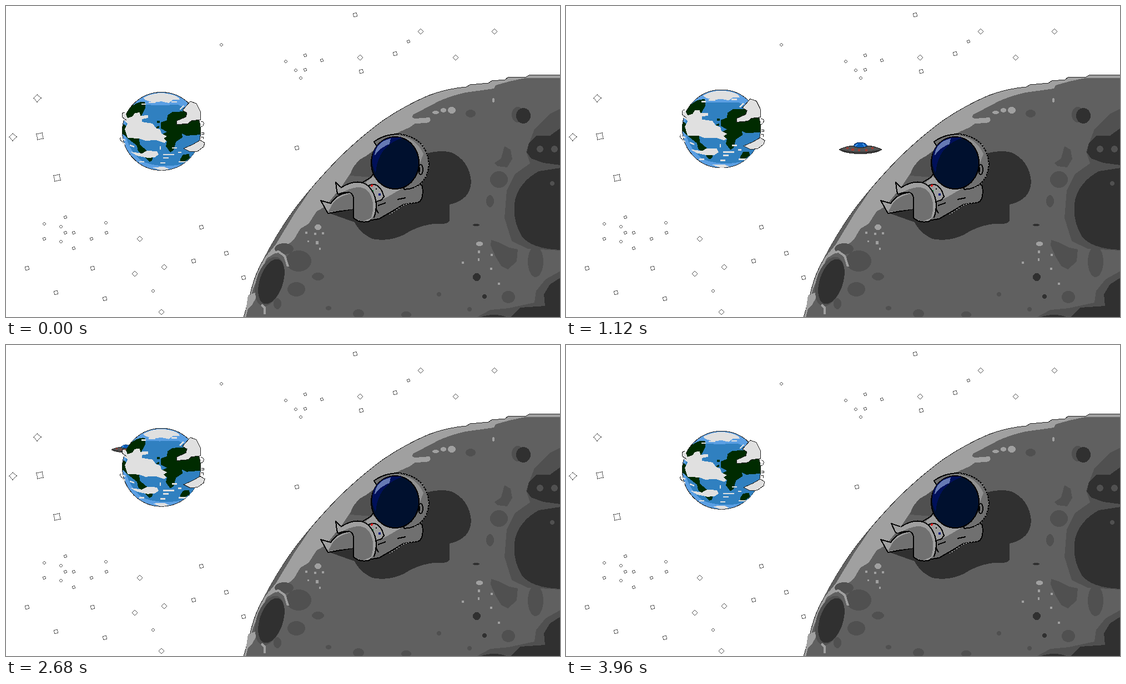
Write an HTML page that moves like this. It is 998x561 px and loops after 4 s.

```html
<!DOCTYPE html>
<html lang="en">
<meta charset="utf-8">
<title>Lunar lounging</title>
<style>
html, body { margin: 0; width: 100%; height: 100%; overflow: hidden; background: #fff }
svg { display: block; width: 100%; height: 100% }
.star { fill: #fff; stroke: #333; stroke-width: .8 }
.mid { fill: #505050 }
.dark { fill: #303030 }
.light { fill: #a0a0a0 }
.line { fill: none; stroke: #000; stroke-width: 2 }
.ink { stroke: #000; stroke-width: 2 }
.cloud { fill: #e0e0e0 }
.edge { stroke: #222; stroke-width: 1 }
.wisp { fill: none; stroke: #e0e0e0; stroke-width: 2.5 }
.land { fill: #002b00 }
</style>
<svg viewBox="0 0 998 561" shape-rendering="crispEdges">
<defs><clipPath id="globe"><circle cx="280" cy="226" r="70.5"/></clipPath></defs>
<g id="stars"></g>

<g id="ufo">
  <path d="M-13-2Q-11-11 0-11T13-2Z" fill="#0b5cb5" stroke="#012a60"/>
  <path d="M-5-9L-10-3M4-9L8-3" stroke="#3f94e8" stroke-width="2"/>
  <path d="M-36 1Q-24-5-13-5Q0 1 13-5Q24-5 36 1Q25 8 0 8T-36 1Z" fill="#555" stroke="#222"/>
  <path d="M-33 2Q0 10 33 2" fill="none" stroke="#333" stroke-width="2"/>
  <path d="M-24-1h4M-15 1h4M-4 2h4M8 2h4M18-1h4" stroke="#a33b32" stroke-width="3"/>
</g>

<g id="earth">
  <circle cx="280" cy="226" r="70.5" fill="#5b9fe3" class="edge"/>
  <g clip-path="url(#globe)">
    <path d="M238 177Q265 180 310 178Q340 190 350 217Q352 260 325 283Q285 295 247 281Q218 260 214 223Q217 190 238 177Z" fill="#3080c0"/>
    <g class="land">
      <path d="M222 185Q236 171 250 173Q254 182 248 190L240 205L213 206Q211 199 222 185Z"/>
      <path d="M205 226L212 213L240 239L241 250L254 261L264 270Q266 280 258 281L248 270L238 262L236 252L222 241Z"/>
      <path d="M279 210L290 206L291 197L300 191L325 190L350 204V232L325 234L317 230L318 237L306 245L302 260L296 264L288 253L290 244L281 238L282 231L290 227L279 221Z"/>
      <path d="M314 276L319 268L330 267L331 274L320 282L314 280ZM271 218l5-2v4l-5 1zM272 207h5v4h-5z"/>
    </g>
    <path class="cloud" d="M247 166Q262 157 282 157Q310 160 313 169L301 169L293 175L280 172L266 174L252 170Z"/>
    <path class="cloud" d="M264 291L285 290L294 294L280 297Z"/>
    <path class="wisp" d="M244 177h8M257 174h12M298 173h10M283 268h20M283 274h10M299 256h9M278 253v6M310 264h6M240 281h9M311 281h15M278 283h9M320 180l-7 7"/>
  </g>
  <g class="cloud">
    <path class="edge" d="M318 188L332 172L343 176L350 190L351 205L334 207L328 212L307 214L308 207L324 200L326 193Z"/>
    <path class="edge" d="M320 257L336 250L350 242L358 247L356 254L345 262L332 263Z"/>
    <path d="M210 194L216 195L219 202L228 199L232 193L241 192L242 198L256 197V202L245 204V209L264 212L270 220L278 223L280 230L290 235L284 239L289 244L285 247L270 242L251 243L240 239L219 238L214 222L219 212L210 204Z"/>
    <path d="M224 263L245 266L254 261L272 262L275 268L268 273L255 274L236 270Z"/>
  </g>
  <path d="M214 192Q207 192 210 201L217 206M207 237q-4 4 4 9M351 208q6 0 5 5t-5 5M352 228h4v3h-4M351 236h4v4" fill="none" stroke="#222"/>
  <path class="wisp" d="M206 239l9 3M209 247l6 2M223 251l8 3M350 214l5 2"/>
</g>

<g id="moon">
  <path class="light edge" d="M428 562L440 520Q447 486 464 457Q490 407 520 366Q555 320 600 274Q640 235 680 206Q720 179 760 162Q793 149 829 146L836 142L869 139L875 135L899 133L905 128L937 128L942 125L999 124V562Z"/>
  <path fill="#606060" d="M999 130L935 130L907 136L882 143L879 149L850 153L828 156Q790 165 770 177L735 195Q727 202 738 203L763 201Q768 209 757 211L737 212L727 219L700 231L668 256L640 277Q625 287 621 301L605 325L575 362L560 370L545 393L530 402L519 421L505 433L470 455L445 510L432 562H999Z"/>
  <path fill="#606060" d="M464 457Q490 407 520 366L554 324L520 374L486 430Z"/>
  <g class="mid">
    <path d="M999 185L979 195L952 222L937 262L944 284L917 303L902 333L898 382L911 424L940 438L999 441Z"/>
    <path d="M999 478L972 493L955 514L952 535L906 545L873 548L847 562H999Z"/>
    <path d="M898 253L909 259L912 276L903 291L885 289L880 283L892 275ZM874 422L889 427L907 436L922 439L920 461L904 475L892 469L882 452L873 432Z"/>
    <path d="M667 260L639 276Q624 288 620 306L660 309Z"/>
    <ellipse cx="837" cy="194" rx="9" ry="7"/><ellipse cx="922" cy="196" rx="11" ry="14"/>
    <ellipse cx="888" cy="313" rx="16" ry="15"/><ellipse cx="872" cy="352" rx="7" ry="11"/>
    <ellipse cx="954" cy="461" rx="14" ry="28"/><ellipse cx="905" cy="525" rx="12" ry="11"/>
    <ellipse cx="527" cy="460" rx="23" ry="19"/><ellipse cx="501" cy="438" rx="17" ry="10"/>
    <ellipse cx="523" cy="511" rx="16" ry="13"/><ellipse cx="562" cy="488" rx="11" ry="7"/>
    <ellipse cx="489" cy="537" rx="7" ry="10"/><ellipse cx="581" cy="545" rx="5" ry="4"/>
    <ellipse cx="635" cy="555" rx="10" ry="8"/><ellipse cx="721" cy="557" rx="9" ry="6"/>
    <circle cx="780" cy="520" r="4"/><circle cx="835" cy="547" r="4"/>
    <ellipse cx="475" cy="497" rx="24" ry="46" transform="rotate(18 475 497)"/>
  </g>
  <g class="dark">
    <path d="M747 270Q776 258 802 264Q834 278 838 316Q837 350 799 358V387Q796 395 770 393Q740 397 718 412Q690 426 660 420Q638 410 628 390L580 373L600 345H650Z"/>
    <path d="M999 220L980 234L955 234L942 247L938 264L946 275L968 283L999 287ZM999 292L960 298Q925 317 917 350Q911 385 929 415Q946 438 999 440ZM999 490L980 502L969 520L971 541L926 544L908 562H999ZM852 562Q880 552 904 562Z"/>
    <ellipse cx="932" cy="198" rx="13" ry="14"/><ellipse cx="847" cy="395" rx="6" ry="2"/>
    <circle cx="848" cy="489" r="7"/><circle cx="862" cy="524" r="4"/>
    <ellipse cx="478" cy="497" rx="21" ry="42" transform="rotate(18 478 497)"/>
  </g>
  <g class="mid"><circle cx="962" cy="258" r="6"/><circle cx="988" cy="258" r="6"/><circle cx="984" cy="320" r="4"/></g>
  <g class="light">
    <ellipse cx="803" cy="188" rx="7" ry="6"/><ellipse cx="788" cy="188" rx="5" ry="4"/>
    <ellipse cx="774" cy="192" rx="6" ry="3"/><ellipse cx="878" cy="170" rx="2" ry="4"/>
    <ellipse cx="562" cy="399" rx="6" ry="5"/><ellipse cx="853" cy="429" rx="6" ry="4"/>
    <path d="M539 407h4v4h-4zM569 408h4v4h-4zM558 424h5v6h-5zM543 423h3v3h-3zM564 436h3v4h-3zM555 409h4v4h-4zM850 441h4v5h-4zM873 447h4v4h-4zM872 472h4v4h-4zM821 461h4v4h-4zM886 499h4v4h-4zM850 455h3v5h-3z"/>
    <path d="M436 522L449 517L450 527L444 538L432 550Z"/>
  </g>
  <path d="M472 447L491 443L502 451L508 470M460 539l6 5v12" fill="none" stroke="#a0a0a0" stroke-width="4"/>
</g>

<g id="astronaut" stroke-linejoin="round">
  <path class="ink" fill="#707070" d="M662 303L656 310L641 319L645 388L672 384L691 373L716 358L743 354Q753 349 750 325L740 317Z"/>
  <path d="M661 308L648 318L674 352L712 330Z" fill="#a0a0a0"/>
  <path d="M680 348L710 334L744 330L742 345L715 355L690 371Z" fill="#707070"/>
  <path class="line" d="M670 360l14-5M705 349l15-3"/>
  <path class="ink" fill="#a0a0a0" stroke-width="1" d="M650 326Q666 315 677 333L681 344L676 350L663 354L650 340Z"/>
  <path d="M651 332h3M655 340h3M663 346h3M666 330h2" class="line"/>
  <circle cx="659" cy="324" r="2" fill="#e02020"/><circle id="lamp" cx="660" cy="334" r="2" fill="#149a45"/>
  <circle cx="673" cy="340" r="2.5" fill="#102080"/>
  <path class="ink" fill="#a0a0a0" d="M567 351L585 356Q598 336 625 336L638 364L580 374Z"/>
  <path d="M580 372L590 354Q604 340 625 338L628 366Z" fill="#707070"/>
  <path id="foot" class="ink" fill="#a0a0a0"/>
  <path fill="#a0a0a0" d="M601 328Q635 308 654 326Q674 349 664 375Q656 391 641 390L627 383L626 346Q624 333 598 338Z"/>
  <path fill="#707070" d="M610 334Q646 317 657 342Q665 359 658 382L643 389L627 383L626 346Q625 334 610 334Z"/>
  <path class="line" d="M603 328Q635 308 654 326Q674 349 663 382M598 340Q623 329 626 346V382Q637 393 656 388M666 365l5 9"/>
  <path class="ink" fill="#707070" d="M663 245Q681 231 709 231Q758 238 762 285Q759 328 718 331Z"/>
  <path d="M692 234Q736 231 752 267L745 285Q742 243 692 234Z" fill="#909090"/>
  <path d="M709 231Q758 238 762 285Q759 320 733 329M691 376L718 358L745 353" fill="none" stroke="#fff" stroke-dasharray="1 4"/>
  <ellipse class="ink" cx="701" cy="283" rx="43" ry="47" fill="#00102e"/>
  <path d="M714 238Q670 252 666 301Q656 282 662 262Q679 231 714 238Z" fill="#00105a"/>
  <path d="M664 270Q666 245 693 239L691 249Q674 255 664 270Z" fill="#667ab4"/>
  <ellipse cx="747" cy="295" rx="4" ry="9" fill="#707070" class="ink"/>
  <path d="M745 291v8" class="line" stroke-width="1"/>
</g>
</svg>
<script>
const LOOP = 4000;
const $ = id => document.getElementById(id);

// Each group: radius, rotation, then x,y pairs.
const starGroups = [
  [3, 0, 388,70, 504,100, 522,116, 531,130, 69,393, 99,398, 99,425, 180,391, 265,514],
  [3.3, 35, 539,89, 569,98, 539,115, 725,64, 107,381, 107,409, 122,409, 69,420, 122,437, 154,420, 181,409],
  [5, 0, 747,46, 880,46, 638,93, 810,93, 241,420, 285,471, 232,483, 280,552],
  [4.8, 35, 629,16, 701,86, 640,118, 524,256, 352,399, 397,446, 338,460, 428,490, 156,473, 38,473, 90,517, 178,528],
  [7.5, 0, 56,166, 12,236],
  [8, 35, 61,235, 92,310]
];
const starPath = r => {
  const k = r * .4;
  return `M0 ${-r}Q${k} ${-k} ${r} 0Q${k} ${k} 0 ${r}Q${-k} ${k} ${-r} 0Q${-k} ${-k} 0 ${-r}Z`;
};
for (const [r, turn, ...points] of starGroups)
  for (let i = 0; i < points.length; i += 2)
    $('stars').insertAdjacentHTML('beforeend',
      `<path class="star" id="s${points[i]}" d="${starPath(r)}" transform="translate(${points[i]} ${points[i + 1]}) rotate(${turn})"/>`);

// Stars that blink out: id, start, end.
const blinks = [['s280', 560, 680], ['s640', 880, 1000], ['s61', 1920, 2080], ['s524', 3080, 3200]];
const show = (id, on) => $(id).setAttribute('visibility', on ? 'visible' : 'hidden');
const move = (id, value) => $(id).setAttribute('transform', value);

function draw(t) {
  move('earth', `translate(0 ${-8 + Math.abs(t - LOOP / 2) / 250})`);

  const x = 603 - .2015 * (t - 760);
  const y = t < 2690 ? 274 - .0448 * (t - 760) : 187.5 + .04 * (t - 2690);
  move('ufo', `translate(${x} ${y}) scale(${1.14 - (t - 760) * .00021})`);
  show('ufo', t > 600);

  for (const [id, start, end] of blinks) show(id, t < start || t >= end);

  const tapping = t >= 3880 || t >= 200 && t < 320;
  $('foot').setAttribute('d', tapping
    ? 'M597 340L593 337L586 322L603 328' : 'M598 340L596 334L594 318L604 328');
  show('lamp', !tapping);
}

function tick(now) {
  const step = Math.floor(now % LOOP / 40) * 40;
  draw(step < 80 ? 0 : step);
  requestAnimationFrame(tick);
}
draw(0);
requestAnimationFrame(tick);
</script>
</html>
```
